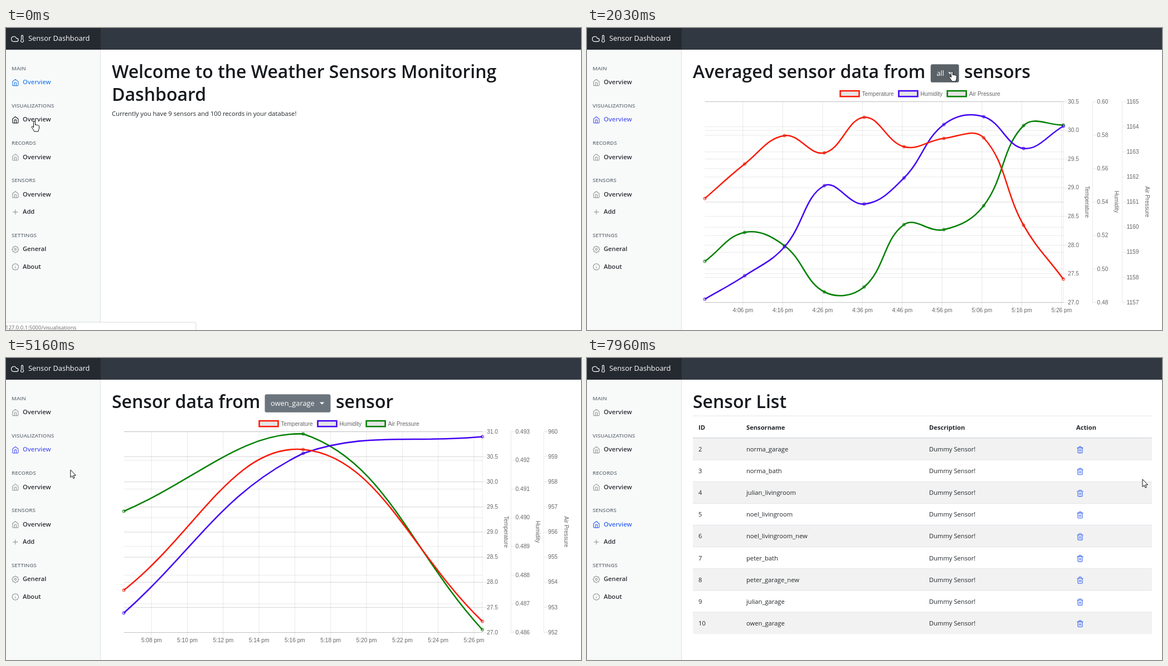
Recreate the animation shown at these times as an HTML page. Size 1032 by 543 pixels, loop 8000 ms.

```html
<!DOCTYPE html>
<html lang="en">
<head>
<meta charset="utf-8">
<title>Sensor Dashboard</title>
<style>
  html, body { margin: 0; width: 100%; height: 100%; overflow: hidden; background: #fff; }
  svg { display: block; }
  text { font-family: "Open Sans", "Noto Sans", sans-serif; font-size: 11.2px; fill: #212529; white-space: pre; }
  .h1 { font-size: 32px; font-weight: 600; fill: #16191d; }
  .b { font-weight: 700; }
  .head { font-size: 9.7px; font-weight: 600; fill: #6c757d; }
  .brand { font-size: 12.8px; fill: #fff; }
  .btn { font-size: 12.8px; fill: #fff; }
  .tick { font-family: "Liberation Sans", Arial, sans-serif; font-size: 10.2px; fill: #666; }
  .url { font-size: 9.5px; fill: #666; }
  .mid { text-anchor: middle; }
  .nav text { font-weight: 600; fill: inherit; }
  .icon { fill: none; stroke-width: 2; stroke-linecap: round; stroke-linejoin: round; }
  .grid { stroke: #000; stroke-opacity: .1; stroke-width: .9; fill: none; }
  .line { fill: none; stroke-width: 2.55; }
  .dot { fill: rgba(0,0,0,.1); stroke-width: .9; }
</style>
</head>
<body>
<div id="stage"></div>
<script>
const LOOP = 8000, TOP = 132, BASE = 493, LEFT = 211, RIGHT = 854.5;
const RED = '#fa1b07', BLUE = '#4400f5', GREEN = '#008000';
const range = n => [...Array(n).keys()];
const clock = m => `${m / 60 | 0}:${String(m % 60).padStart(2, 0)}`;
const ramp = (t, a, b) => Math.max(0, Math.min(1, (t - a) / (b - a)));

const text = (x, y, s, cls = '', more = '') => `<text x="${x}" y="${y}" class="${cls}" ${more}>${s}</text>`;
const rect = (x, y, w, h, fill, more = '') => `<rect x="${x}" y="${y}" width="${w}" height="${h}" fill="${fill}" ${more}/>`;
const title = (x, s, y = 90) => text(x, y, s, 'h1');
const icon = (x, y, name, stroke = '') =>
  `<path class="icon" d="${ICONS[name]}" ${stroke && `stroke="${stroke}"`} transform="translate(${x} ${y}) scale(.567)"/>`;

const gear = 'M' + range(64).map(i => {
  const a = i * Math.PI / 32, r = 9.4 + 1.3 * Math.cos(8 * a);
  return (12 + r * Math.cos(a)).toFixed(1) + ' ' + (12 + r * Math.sin(a)).toFixed(1);
}).join('L') + 'Z';
const ICONS = {
  home: 'M3 9l9-7 9 7v11a2 2 0 0 1-2 2H5a2 2 0 0 1-2-2zM9 22V12h6v10',
  plus: 'M12 5v14M5 12h14',
  gear: gear + 'M15 12a3 3 0 1 0-6 0 3 3 0 1 0 6 0',
  info: 'M22 12a10 10 0 1 0-20 0 10 10 0 1 0 20 0M12 16v-4M12 8v0',
  cloud: 'M18 10h-1.26A8 8 0 1 0 9 20h9a5 5 0 0 0 0-10z',
  thermo: 'M14 14.76V3.5a2.5 2.5 0 0 0-5 0v11.26a4.5 4.5 0 1 0 5 0z',
  trash: 'M3 6h18M8 6V4a2 2 0 0 1 2-2h4a2 2 0 0 1 2 2v2M19 6v14a2 2 0 0 1-2 2H7a2 2 0 0 1-2-2V6M10 11v6M14 11v6'
};

// Sidebar
const SECTIONS = [['MAIN', 'home Overview'], ['VISUALIZATIONS', 'home Overview'], ['RECORDS', 'home Overview'],
  ['SENSORS', 'home Overview', 'plus Add'], ['SETTINGS', 'gear General', 'info About']];
const linkYs = [];
let nav = icon(9, 13, 'cloud', '#fff') + icon(22.5, 12.5, 'thermo', '#fff') + text(40, 23, 'Sensor Dashboard', 'brand');
let navY = 72;
for (const [head, ...links] of SECTIONS) {
  nav += text(10, navY + 3.7, head, 'head');
  navY += 25.2;
  for (const link of links) {
    const [name, label] = link.split(' ');
    nav += `<g class="nav">${icon(10, navY - 6, name)}${text(30, navY + 4, label)}</g>`;
    linkYs.push(navY);
    navY += 31.45;
  }
  navY += 10.5;
}
const shell = w => rect(0, 39, w, 504, '#f8fafa') + rect(w - 1, 39, 1, 504, '#dcdfe1')
  + rect(0, 0, 1032, 39, '#323841') + rect(0, 0, w, 39, '#252a31');

// Charts
function axis(x, lo, hi, n, digits, name, nameX) {
  return range(n + 1).map(i => {
    const y = BASE - (BASE - TOP) * i / n;
    return `<path class="grid" d="M${LEFT} ${y}H${RIGHT}M${x} ${y}h8"/>`
      + text(x + 8, y + 3.2, (lo + (hi - lo) * i / n).toFixed(digits), 'tick');
  }).join('') + `<path class="grid" d="M${x} ${TOP}V${BASE}"/>`
    + text(0, 0, name, 'tick mid', `transform="translate(${nameX - 3.9} 312) rotate(90)"`);
}
const timeAxis = (x0, step, n, start, every) => range(n).map(i =>
  `<path class="grid" d="M${x0 + step * i} ${TOP}V501"/>`
  + text(x0 + step * i, 510.3, clock(start + every * i) + ' pm', 'tick mid')).join('');
const legend = [[454, RED, 'Temperature'], [559, BLUE, 'Humidity'], [646.2, GREEN, 'Air Pressure']].map(([x, c, s]) =>
  rect(x, 112.5, 34, 10.2, '#e5e5e5', `stroke="${c}" stroke-width="2.55"`) + text(x + 39, 121.1, s, 'tick')).join('');
const chart = axes => `<g transform="translate(.5 .5)">${legend}${axes}<g class="plot"></g></g>`;

function spline(ys) {
  const pts = ys.map((y, i) => [LEFT + (RIGHT - LEFT) * i / (ys.length - 1), y]);
  const cap = y => Math.max(TOP, Math.min(BASE, y));
  return pts.map((p, i) => {
    const a = pts[i - 1] || p, b = pts[i + 1] || p;
    const d0 = Math.hypot(p[0] - a[0], p[1] - a[1]), d1 = Math.hypot(b[0] - p[0], b[1] - p[1]);
    const f0 = .4 * d0 / (d0 + d1), f1 = .4 * d1 / (d0 + d1), dx = b[0] - a[0], dy = b[1] - a[1];
    return { p, prev: [p[0] - f0 * dx, cap(p[1] - f0 * dy)], next: [p[0] + f1 * dx, cap(p[1] + f1 * dy)] };
  });
}
function plot(green, blue, red) {
  const curves = [[GREEN, spline(green)], [BLUE, spline(blue)], [RED, spline(red)]];
  return k => {
    const rise = y => BASE - (BASE - y) * k;
    const at = ([x, y]) => x.toFixed(2) + ' ' + rise(y).toFixed(2);
    return curves.map(([color, c]) => {
      const d = 'M' + at(c[0].p) + c.slice(1).map((q, i) => `C${at(c[i].next)} ${at(q.prev)} ${at(q.p)}`).join('');
      return `<path class="line" stroke="${color}" d="${d}"/>` + c.map(({ p }) =>
        `<circle class="dot" stroke="${color}" r="2.6" cx="${p[0]}" cy="${rise(p[1])}"/>`).join('');
    }).join('');
  };
}
const plots = [
  plot([419, 367, 391, 474, 465, 353, 362, 319, 175, 174],
    [487, 445, 393, 283, 316, 269, 173, 159, 216, 176],
    [306, 244, 193, 224, 160, 213, 198, 197, 354, 451]),
  plot([275, 136, 488], [458, 171, 141], [417, 164, 473])
];

// Tables
const table = (x, w, cols, heads, rows, iconX) => rect(x, 103.6, w, .9, '#dee2e6')
  + heads.map((s, i) => text(cols[i], 128.5, s, 'b')).join('')
  + rows.map((row, i) => {
    const y = 144.2 + 39.1 * i;
    return rect(x, y, w, 39.1, i % 2 ? '#fff' : '#f2f2f2') + rect(x, y - .4, w, .9, '#dee2e6')
      + row.map((s, j) => text(cols[j], y + 23.8, s)).join('')
      + icon(iconX, y + 14, 'trash', '#3a66f2');
  }).join('') + rect(x, 142.7, w, 1.7, '#dee2e6');

const SENSORS = ['norma_garage', 'norma_bath', 'julian_livingroom', 'noel_livingroom', 'noel_livingroom_new',
  'peter_bath', 'peter_garage_new', 'julian_garage', 'owen_garage'];
let seed = 11;
const random = () => (seed = seed * 48271 % 2147483647) / 2147483647;
const records = range(11).map(i => [11 + i, SENSORS[0], `2018-10-17 ${clock(17 * 60 + 26 - 10 * i)}:25.330182`,
  20 + 7 * random(), .2 + .2 * random(), 1330 + 12 * random()]);

const scrollbar = (x, y, h, thumbY, thumbH) => rect(x, y, 12, h, '#f1f1f1') + rect(x + 1.5, thumbY, 9.5, thumbH, '#c1c1c1')
  + `<path fill="#505050" d="M${x + 3} ${y + 7.5}l3-3 3 3zM${x + 3} ${y + h - 7.5}l3 3 3-3z"/>`;
const button = (x, w, s) => rect(x, 65.3, w, 32.5, '#6c757d', 'rx="3.4" class="box"') + text(x + 10.6, 86.3, s, 'btn')
  + `<path fill="#fff" d="M${x + w - 19.5} 79.4h8.4l-4.2 4.2z"/>`;

// Pages
const pages = [
  title(190, 'Welcome to the Weather Sensors Monitoring') + title(190, 'Dashboard', 131)
    + text(190, 158, 'Currently you have 9 sensors and 100 records in your database!'),
  title(190, 'Averaged sensor data from') + title(677, 'sensors') + button(616.8, 50.8, 'all')
    + chart(axis(RIGHT, 27, 30.5, 7, 1, 'Temperature', 897.5) + axis(907, .48, .6, 6, 2, 'Humidity', 950.5)
      + axis(960, 1157, 1165, 8, 0, 'Air Pressure', 1005) + timeAxis(279.3, 71.5, 9, 246, 10)),
  title(190, 'Sensor data from') + title(592, 'sensor') + button(464.5, 118, 'owen_garage')
    + chart(axis(RIGHT, 27, 31, 8, 1, 'Temperature', 897) + axis(906, .486, .493, 7, 3, 'Humidity', 954.5)
      + axis(964.5, 952, 960, 8, 0, 'Air Pressure', 1005) + timeAxis(260.7, 64.3, 10, 308, 2)),
  title(188, 'Records overview')
    + table(188, 812, [198, 238, 368, 539, 672, 818, 951],
      ['ID', 'Sensorname', 'Time', 'Temperature', 'Humidity', 'Air Pressure', 'Action'], records, 951.2)
    + scrollbar(1020, 0, 543, 12, 78),
  title(190, 'Sensor List')
    + table(190, 824, [200, 286, 614, 878], ['ID', 'Sensorname', 'Description', 'Action'],
      SENSORS.map((s, i) => [i + 2, s, 'Dummy Sensor!']), 878.2)
].map((body, i) => `<g class="page">${shell(i === 3 ? 167 : 170)}${body}</g>`).join('');

const menu = rect(617.2, 100, 165.5, 220.7, '#fff', 'rx="3.4" stroke="#ccc" stroke-width=".9"')
  + rect(618, 107.4, 152, 24.7, '#f8f9fa', 'id="pick"')
  + [...SENSORS].reverse().slice(0, 8).map((s, i) => text(638, 123.8 + 24.65 * i, s, '', i ? '' : 'id="pickText"')).join('')
  + scrollbar(770, 100.8, 219, 112, 182);

document.getElementById('stage').innerHTML = `<svg width="1032" height="543" viewBox="0 0 1032 543">
${pages}${nav}
<rect id="ring" x="615.4" y="63.9" width="53.5" height="35.3" rx="4.6" fill="none" stroke="#6c757d" stroke-opacity=".5" stroke-width="2.8"/>
<g id="menu">${menu}</g>
<g id="status">${rect(-2, 529, 343, 20, '#fff', 'rx="3" stroke="#d3d5d7" stroke-width=".9"')}${text(-1, 542, '', 'url', 'id="url"')}</g>
<g id="cursor" fill="#fff" stroke="#000" stroke-width=".95" stroke-linejoin="round">
<path id="arrow" d="M0 0V13.6L3.1 10.7L5.1 15.4L7.2 14.5L5.2 10H9.5Z"/>
<path id="hand" transform="translate(-5.5 0)" d="M4 12V2.2a1.5 1.5 0 0 1 3 0V7.6a1.4 1.4 0 0 1 2.6.3 1.4 1.4 0 0 1 2.4.5 1.2 1.2 0 0 1 2 .9V13c0 2-1.5 3-1.5 6H5C5 16.5 1 13.5.6 11.2A1.3 1.3 0 0 1 2.8 10.2Z"/>
</g></svg>`;

const $ = id => document.getElementById(id);
const pageEls = document.querySelectorAll('.page'), navEls = document.querySelectorAll('.nav');
const plotEls = document.querySelectorAll('.plot'), allBtn = document.querySelector('.box');
const show = (el, on) => { el.style.display = on ? '' : 'none'; };

// Timeline: page starts, pointer moves [from, to, x, y], status bar [in, out, path]
const STARTS = [0, 560, 3900, 6010, 7480];
const ACTIVE = [0, 1, 1, 2, 3], TINT = ['#2f80ea', '#545cf0', '#545cf0', '#3366f5', '#3366f5'];
const MOVES = [[640, 1010, 161, 180], [1010, 1500, 449, 53], [1690, 2030, 655, 77], [2280, 2670, 649, 130],
  [3680, 4700, 400, 50], [4700, 5160, 116, 201], [5160, 5390, 73, 231], [6100, 6640, 73, 303],
  [7200, 7330, 90, 303], [7600, 7960, 997, 218]];
const URLS = [[-200, 600, 'visualisations'], [2780, 3680, 'visualisations/show/owen_garage'],
  [5540, 6010, 'records'], [6750, 7640, 'sensors']];

const pointer = t => MOVES.reduce(([x, y], [a, b, u, v]) => {
  const k = ramp(t, a, b);
  return [x + (u - x) * k, y + (v - y) * k];
}, [51, 167]);

function draw(t) {
  const page = STARTS.filter(s => s <= t).length - 1, [x, y] = pointer(t);
  pageEls.forEach((el, i) => show(el, i === page));

  const hover = x < 170 ? linkYs.findIndex(l => Math.abs(y - l) < 15.7) : -1;
  navEls.forEach((el, i) => {
    const on = i === ACTIVE[page];
    el.style.fill = on ? TINT[page] : '#2a2d33';
    el.firstChild.style.stroke = on ? TINT[page] : i === hover ? '#212529' : '#999';
  });

  if (page === 1 || page === 2) {
    const start = page === 1 ? 529 : STARTS[2];
    plotEls[page - 1].innerHTML = plots[page - 1](1 - (1 - ramp(t, start, start + 1000)) ** 4);
  }

  const open = t >= 2200 && t < 3400, pressed = t >= 3280;
  const onBtn = page === 1 && x > 617 && x < 668 && y > 65 && y < 98;
  const onMenu = open && y > 107;
  allBtn.style.fill = onBtn || t >= 2200 ? '#5a6268' : '#6c757d';
  show($('menu'), open);
  $('ring').style.opacity = ramp(t, 2190, 2350) * (1 - ramp(t, 3380, 3510));
  $('pick').style.fill = pressed ? '#007bff' : onMenu ? '#f0f2f4' : '#fff';
  $('pickText').style.fill = pressed ? '#fff' : '#212529';

  const url = URLS.find(u => t >= u[0] && t < u[1] + 120);
  show($('status'), url);
  if (url) {
    $('status').style.opacity = ramp(t, url[0], url[0] + 120) * (1 - ramp(t, url[1], url[1] + 120));
    $('url').textContent = '127.0.0.1:5000/' + url[2];
  }

  const hand = hover >= 0 || onBtn || onMenu;
  show($('hand'), hand);
  show($('arrow'), !hand);
  $('cursor').setAttribute('transform', `translate(${x.toFixed(1)} ${y.toFixed(1)})`);
}

const begin = performance.now();
function tick(now) {
  draw(Math.max(0, now - begin) % LOOP);
  requestAnimationFrame(tick);
}
draw(0);
requestAnimationFrame(tick);
</script>
</body>
</html>
```
